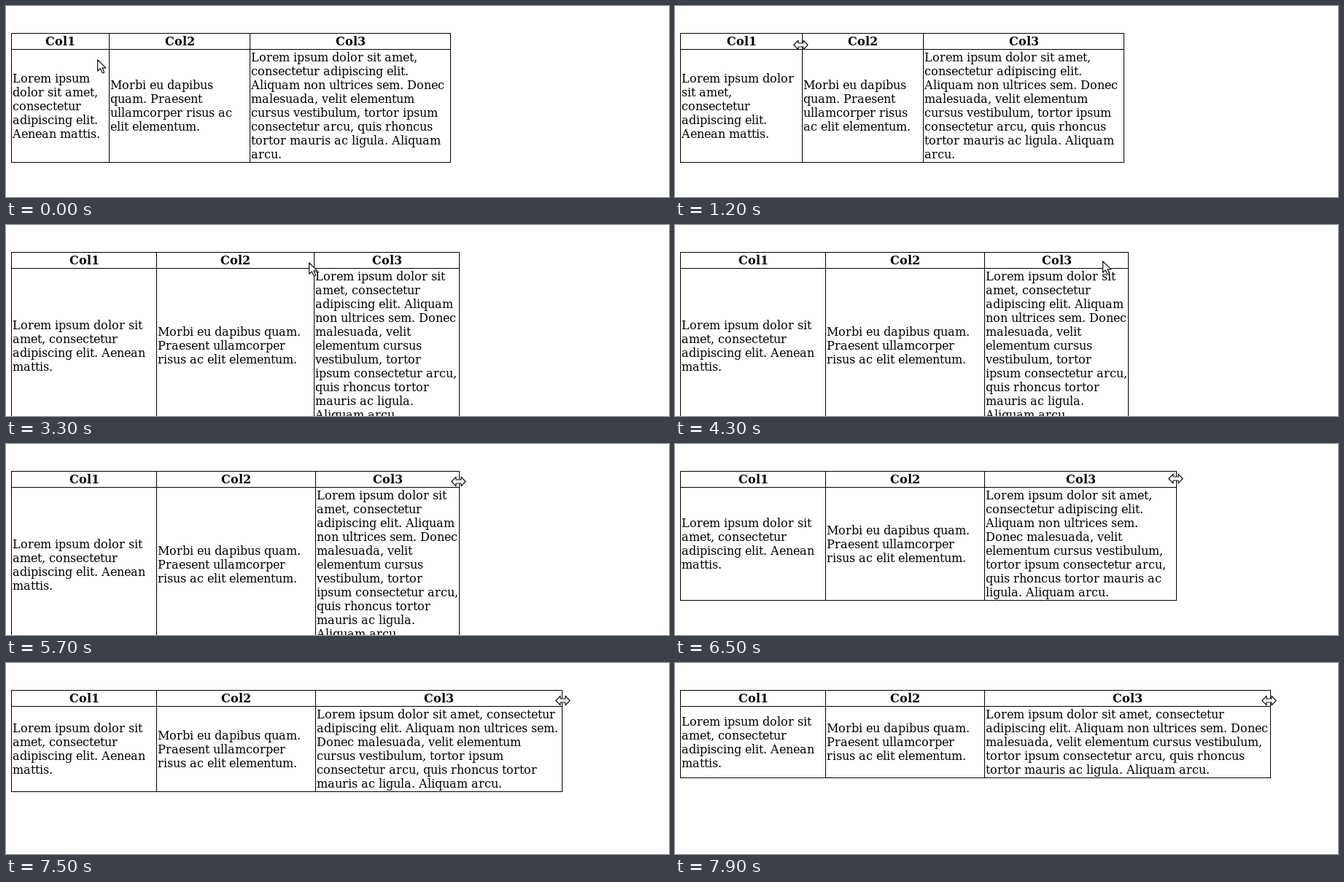
An HTML page that plays this animation: 909 by 262 pixels, repeating every 8 s.

```html
<!DOCTYPE html>
<html lang="en">
<head>
<meta charset="utf-8">
<title>Resizable table columns</title>
<style>
html, body { margin: 0; width: 100%; height: 100%; overflow: hidden; background: #fff; }
svg { display: block; }
text { font: 16px "DejaVu Serif", serif; fill: #000; }
.head { font-weight: bold; }
.grid { fill: none; stroke: #000; shape-rendering: crispEdges; }
.cursor { fill: #fff; stroke: #111; stroke-width: 1.2; stroke-linejoin: round; }
</style>
</head>
<body>
<svg width="909" height="262" viewBox="0 0 909 262">
  <path class="grid" id="grid"/>
  <g id="words"></g>
  <g id="pointer">
    <path class="cursor" id="arrow" d="M.6.8V16.2L4.3 12.8 7 18.6Q8.4 19.6 9.6 17.6L7 11.9H11.9Z"/>
    <path class="cursor" id="handle" d="M-9.6 0-3.5-6.3V-2.5H3.5V-6.3L9.6 0 3.5 6.3V2.5H-3.5V6.3Z"/>
  </g>
</svg>
<script>
const LOOP = 8000, STEP = 100;
const LEFT = 7, TOP = 37, BODY = 59, LINE = 19, ASCENT = 15;
const FONT = '16px "DejaVu Serif", serif';
const EDGES = [141, 334, 609], POINTER = [125, 73];
const GROW = 6; // gained by the table when an inner column is grabbed

const cells = [
  "Lorem ipsum dolor sit amet, consectetur adipiscing elit. Aenean mattis.",
  "Morbi eu dapibus quam. Praesent ullamcorper risus ac elit elementum.",
  "Lorem ipsum dolor sit amet, consectetur adipiscing elit. Aliquam non ultrices sem. " +
  "Donec malesuada, velit elementum cursus vestibulum, tortor ipsum consectetur arcu, " +
  "quis rhoncus tortor mauris ac ligula. Aliquam arcu."
];

// Pointer moves: start, end, x, y, then the dragged column and its new edge
const moves = [
  [0, 500, 141, 54],
  [1000, 1400, 202, 53, 0, 206],
  [1700, 2400, 337, 53],
  [3000, 3300, 415, 51, 1, 422],
  [3300, 3500, 416, 53, 1, 424],
  [3700, 4400, 614, 48],
  [4500, 4800, 621, 48],
  [5100, 5200, 614, 50],
  [5500, 5700, 620, 52],
  [6200, 6500, 686, 48, 2, 687],
  [6500, 7100, 758, 51, 2, 757],
  [7400, 7500, 763, 52, 2, 762],
  [7500, 7900, 814, 52, 2, 816]
];
// Spans in which the pointer is a resize handle
const handleSpans = [[400, 1800], [2400, 3200], [4600, 4800], [5600, LOOP]];

const $ = id => document.getElementById(id);
const pen = document.createElement("canvas").getContext("2d");
const mix = (a, b, u) => Math.round(a + (b - a) * u);

function stateAt(t) {
  const edges = [...EDGES];
  let [x, y] = POINTER, lastEnd = -1;
  for (const [start, end, toX, toY, col, edge] of moves) {
    if (t <= start) break;
    const u = Math.min(1, (t - start) / (end - start));
    x = mix(x, toX, u);
    y = mix(y, toY, u);
    if (edge) {
      edges[col] = mix(edges[col], edge, u);
      const grabbed = start !== lastEnd;
      for (let i = col + 1; grabbed && i < edges.length; i++) edges[i] += GROW;
    }
    lastEnd = end;
  }
  return { x, y, edges };
}

// Glyphs advance by whole pixels, as with hinted type
const advances = {};
function advance(ch, weight) {
  const key = weight + ch;
  if (!(key in advances)) {
    pen.font = weight + " " + FONT;
    advances[key] = Math.round(pen.measureText(ch).width);
  }
  return advances[key];
}
const widthOf = (text, weight = "normal") =>
  [...text].reduce((sum, ch) => sum + advance(ch, weight), 0);

function wrap(text, width) {
  const lines = [];
  let line = "";
  for (const word of text.split(" ")) {
    const next = line ? line + " " + word : word;
    if (line && widthOf(next) > width) {
      lines.push(line);
      line = word;
    } else line = next;
  }
  return [...lines, line];
}

function label(x, y, text, weight = "normal") {
  const xs = [...text].map(ch => (x += advance(ch, weight)) - advance(ch, weight));
  return `<text class="${weight === "bold" ? "head" : ""}" x="${xs.join(" ")}" y="${y}">${text}</text>`;
}

function drawTable(edges) {
  const xs = [LEFT, ...edges];
  const columns = cells.map((text, i) => wrap(text, xs[i + 1] - xs[i] - 3));
  const rows = Math.max(...columns.map(lines => lines.length));
  const bottom = BODY + rows * LINE + 3;

  $("grid").setAttribute("d",
    [TOP, BODY, bottom].map(y => `M${LEFT} ${y + .5}H${xs[3] + 1}`).join("") +
    xs.map(x => `M${x + .5} ${TOP}V${bottom + 1}`).join(""));

  $("words").innerHTML = columns.map((lines, i) => {
    const title = "Col" + (i + 1);
    const titleX = Math.round((xs[i] + xs[i + 1] + 1 - widthOf(title, "bold")) / 2);
    const first = BODY + 2 + ASCENT + Math.round((rows - lines.length) * LINE / 2);
    return label(titleX, TOP + 2 + ASCENT, title, "bold") +
      lines.map((line, n) => label(xs[i] + 2, first + n * LINE, line)).join("");
  }).join("");
}

function drawPointer(t, x, y) {
  const resizing = handleSpans.some(([from, to]) => t >= from && t < to);
  $("arrow").style.display = resizing ? "none" : "";
  $("handle").style.display = resizing ? "" : "none";
  $("pointer").setAttribute("transform",
    resizing ? `translate(${x + .5} ${y - .5})` : `translate(${x} ${y})`);
}

let shown = -1;
function frame(now) {
  const t = Math.floor(now % LOOP / STEP) * STEP;
  if (t !== shown) {
    const { x, y, edges } = stateAt(t);
    drawTable(edges);
    drawPointer(t, x, y);
    shown = t;
  }
  requestAnimationFrame(frame);
}
frame(performance.now());
</script>
</body>
</html>
```
